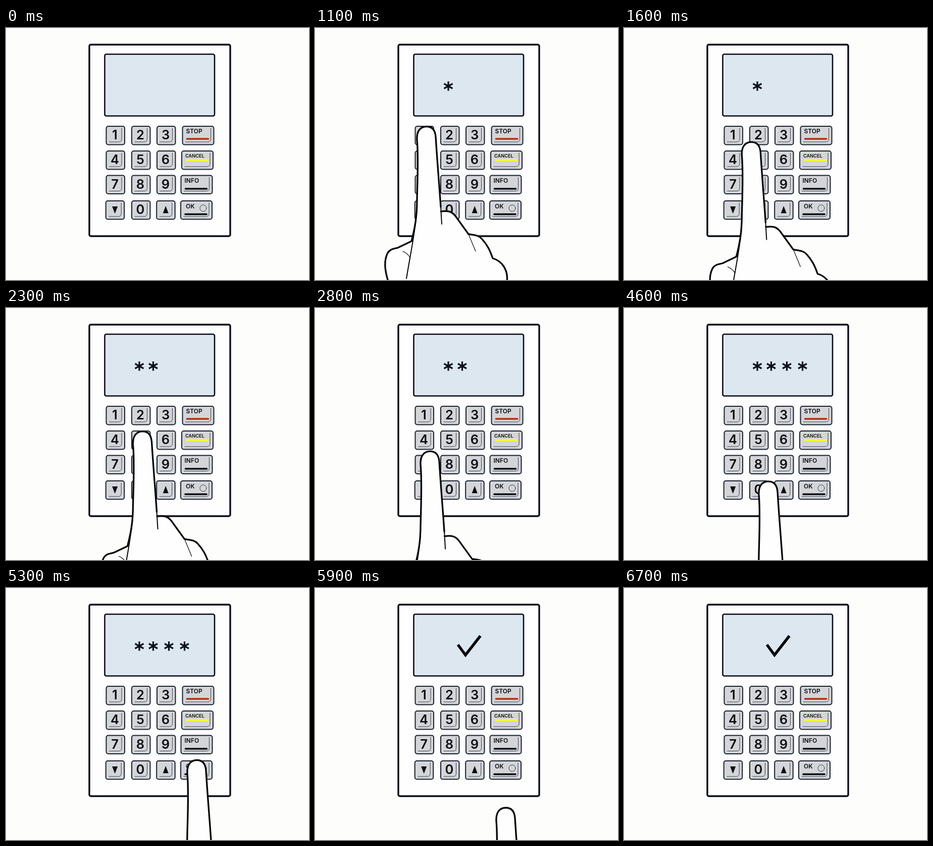
These frames come from a looping animation (600 by 500 pixels, 6.8 s). An HTML page:

```html
<!DOCTYPE html>
<html lang="en">
<head>
<meta charset="utf-8">
<title>PIN entry</title>
<style>
  html, body { margin: 0; width: 100%; height: 100%; overflow: hidden; background: #fdfdfc; }
  svg { display: block; width: 600px; height: 500px; }
  text { font-family: Inter, "Liberation Sans", sans-serif; font-weight: 600; fill: #0a0d12; }
</style>
</head>
<body>
<svg viewBox="0 0 600 500" fill="none" stroke-linecap="round" stroke-linejoin="round">
  <rect x="165" y="33" width="279" height="380" rx="3" fill="#fefefe" stroke="#090d18" stroke-width="3.4"/>
  <rect x="195.5" y="52" width="217.5" height="122.5" rx="3" fill="#dce7f0" stroke="#090d18" stroke-width="2.600"/>
  <g id="stars" stroke="#0a0f1a" stroke-width="3.2" stroke-linecap="butt"></g>
  <path id="check" d="M283 112.500L298 133L327.500 95" stroke="#040506" stroke-width="5.500"
        stroke-linecap="butt" stroke-linejoin="miter"/>
  <g id="keys"></g>
  <g id="hand" stroke="#040506" stroke-width="3.300">
    <path id="skin" fill="#fefefe" stroke="none"/>
    <path id="outline"/>
    <path d="M201.500 365C199 400 192 432 181 497" stroke-width="2"/>
    <path d="M249 355L251 389" stroke-width="2"/>
    <path d="M304 409L318 443M174 443Q183 447 188 455" stroke-width="1.200"/>
  </g>
</svg>
<script>
const LOOP = 6800, STEP = 100;
const $ = id => document.getElementById(id);

function add(parent, tag, attrs, text) {
  const el = document.createElementNS("http://www.w3.org/2000/svg", tag);
  for (const name in attrs) el.setAttribute(name, attrs[name]);
  if (text) el.textContent = text;
  parent.append(el);
  return el;
}

const ink = "#0a0d12", fineLine = "#3a3e48";

function addKey(x, y, width) {
  const key = add($("keys"), "g", { transform: `translate(${x} ${y})` });
  add(key, "rect", { width, height: 36.5, rx: 4, fill: "#d3d5d8", stroke: "#1a2030", "stroke-width": 2 });
  add(key, "path", {
    d: `M6 31H${width - 12}Q${width - 6} 31 ${width - 6} 25V4`,
    stroke: fineLine, "stroke-width": 1
  });
  return key;
}

// Number pad
const columns = [198.5, 249, 299], rows = [195, 244, 292.5, 343];
["123", "456", "789", "v0^"].forEach((line, r) => [...line].forEach((label, c) => {
  const key = addKey(columns[c] - (label === "v" || label === "^" ? 0.8 : 0), rows[r], 36.5);
  if (label === "v") add(key, "path", { d: "M12.500 11H23.500L18 25.500Z", fill: ink });
  else if (label === "^") add(key, "path", { d: "M12.500 24.500H23.500L18 10Z", fill: ink });
  else add(key, "text", { x: 17, y: 26, "font-size": 25.5, "text-anchor": "middle" }, label);
}));

// Function keys: label, x, font size, label x, baseline, bar x, bar y, bar colour
[
  ["STOP", 349.5, 12, 7, 14, 9, 25, "#b23010"],
  ["CANCEL", 348, 9.2, 7, 12.5, 9.5, 18, "#ffff10"],
  ["INFO", 346.5, 12, 7, 14, 9, 26.5, ink],
  ["OK", 346, 12, 10, 14.5, 9, 26.5, ink]
].forEach(([label, x, size, textX, baseline, barX, barY, color], r) => {
  const key = addKey(x, rows[r], 62);
  add(key, "text", { x: textX, y: baseline, "font-size": size }, label);
  add(key, "path", { d: `M${barX} ${barY}h42`, stroke: color, "stroke-width": 3.6 });
  if (label === "OK") add(key, "circle", { cx: 44.5, cy: 14.5, r: 6.5, stroke: fineLine, "stroke-width": 1 });
});

const stars = [264, 291.5, 322.5, 353.5].map(x => add($("stars"), "path", {
  d: `M${x} 106v18.500M${x - 8.5} 110.500l17 9.500M${x - 8.5} 120l17 -9.500`
}));

const thumb = "M145 503C138 480 136 462 144 446C150 437 158 438 164 436L191 423";
const finger = "C198 396 202 374 202 340C203 300 205 255 202 222C201 204 209 195.500 221 195.500" +
  "C232 195.500 238 203 239 216C242 265 246 310 249 355";
const fist = "C264 362 271 364 278 373L304 409C316 411 324 411 330 418C341 430 346 440 352 457" +
  "C370 462 383 480 380 503";
$("skin").setAttribute("d", thumb + finger + "L249.500 364" + fist + "Z");
$("outline").setAttribute("d", thumb + finger + "M249.500 364" + fist);

// Fingertip moves: start, end, destination
const entry = [221, 530];
const moves = [
  [100, 800, 221, 195],
  [1190, 1890, 271, 244],
  [2260, 2960, 221.5, 290],
  [3355, 4055, 270, 344],
  [4430, 5130, 378, 341],
  [5550, 6250, 378, 530]
];
const starTimes = [900, 2000, 3100, 4200], checkTime = 5600;

function fingertip(t) {
  let [x, y] = entry;
  for (const [start, end, toX, toY] of moves) {
    const u = Math.min(1, Math.max(0, (t - start) / (end - start)));
    const eased = u * u * (3 - 2 * u);
    x += (toX - x) * eased;
    y += (toY - y) * eased;
  }
  return [x, y];
}

const show = (el, visible) => el.setAttribute("visibility", visible ? "visible" : "hidden");

function draw(t) {
  const [x, y] = fingertip(t);
  $("hand").setAttribute("transform", `translate(${x - 221} ${y - 195})`);
  stars.forEach((star, i) => show(star, t >= starTimes[i] && t < checkTime));
  show($("check"), t >= checkTime);
}

const begin = performance.now();
function tick() {
  const t = (performance.now() - begin) % LOOP;
  draw(Math.floor(t / STEP) * STEP);
  requestAnimationFrame(tick);
}
draw(0);
requestAnimationFrame(tick);
</script>
</body>
</html>
```
